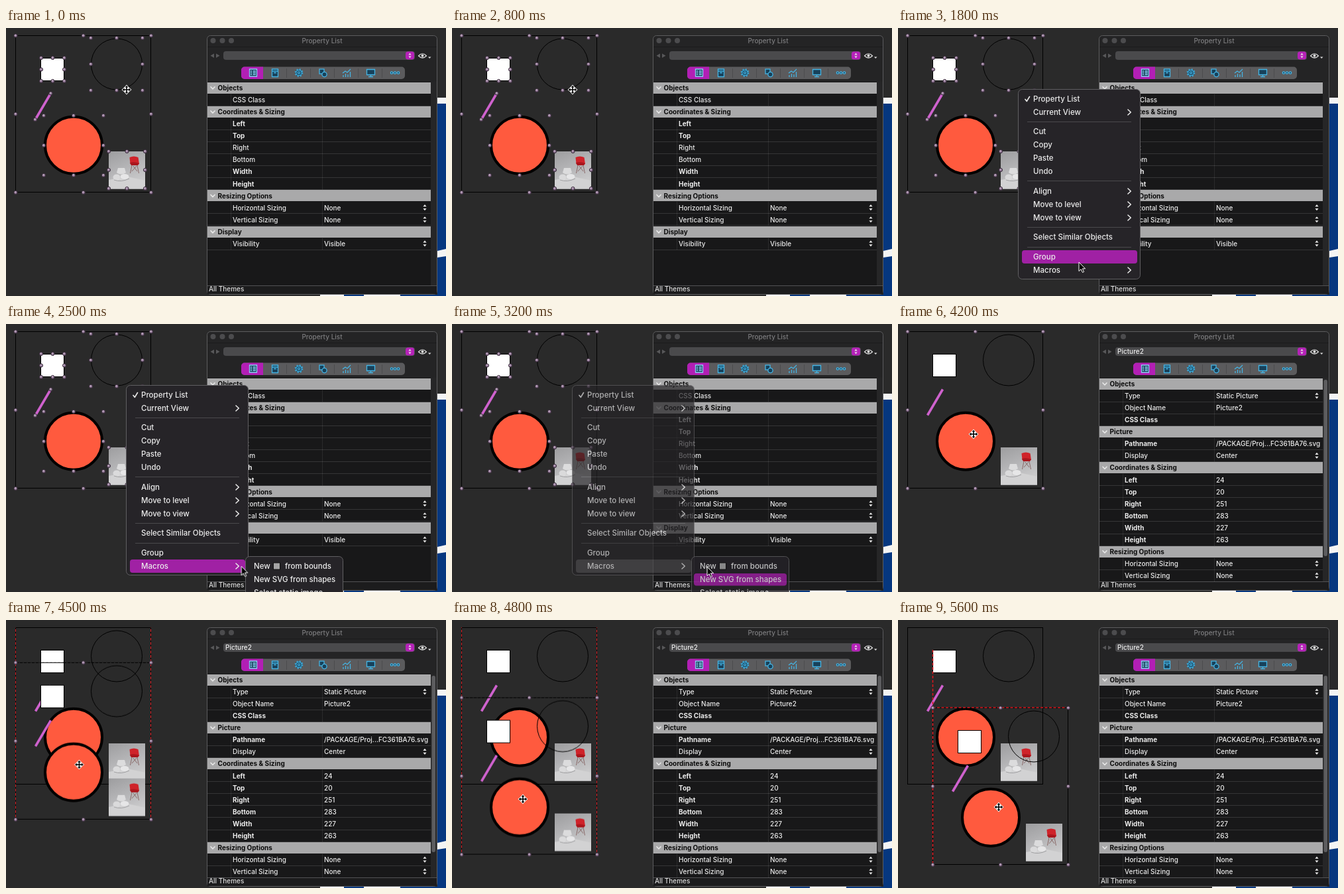
Recreate the animation shown at these times as an HTML page. Size 664 by 404 pixels, loop 5.7 s.

```html
<!DOCTYPE html>
<html lang="en">
<head>
<meta charset="utf-8">
<title>Shapes to SVG</title>
<style>
html, body { margin: 0; width: 100%; height: 100%; overflow: hidden; background: #2a2a2a; }
svg { display: block; }
text { font: 500 10px Inter, "Open Sans", sans-serif; fill: #ececec; white-space: pre; }
.bold { font-weight: 700; }
.menu text { font-size: 11.5px; }
.thin { fill: none; stroke: #000; }
.icon { fill: #17415a; stroke: #45b4e4; stroke-width: 1.3; }
.guide { stroke: #d8161d; stroke-dasharray: 4 2.5; fill: none; }
.chev { fill: none; stroke: #e8e8e8; stroke-width: 1.6; stroke-linecap: round; stroke-linejoin: round; }

/* every step lasts 100 ms, 57 steps per loop */
.anim { animation: 5.7s step-end infinite; }
#cursor { animation-name: cursor; }
#arrow { animation-name: arrow; }
#cross { animation-name: cross; }
#menu { animation-name: menu; }
#submenu { animation-name: submenu; }
#hover { animation-name: hover; }
#subHover { animation-name: subHover; }
#before { animation-name: before; }
#after { animation-name: after; }
#marks { animation-name: before; }
.drag { animation-name: drag; }
#copy { animation-name: copy; }
#sideGuides { animation-name: sideGuides; }
#snapGuides { animation-name: snapGuides; }

@keyframes cursor {
  0% { transform: translate(182px, 93px); }
  22.80% { transform: translate(182px, 93px); animation-timing-function: steps(5); }
  31.57% { transform: translate(273px, 353px); }
  33.33% { transform: translate(280px, 362px); }
  36.84% { transform: translate(280px, 362px); animation-timing-function: steps(5); }
  45.61% { transform: translate(374px, 366px); }
  47.36% { transform: translate(376px, 368px); animation-timing-function: steps(2); }
  50.87% { transform: translate(390px, 382px); }
  54.38% { transform: translate(388px, 374px); }
  56.14% { transform: translate(385px, 366px); animation-timing-function: steps(8); }
  70.17% { transform: translate(114px, 166px); }
  73.68% { transform: translate(114px, 166px); animation-timing-function: steps(6); }
  84.21% { transform: translate(107px, 270px); animation-timing-function: steps(6); }
  94.73% { transform: translate(150px, 281px); }
  96.49%, 100% { transform: translate(152px, 282px); }
}
@keyframes arrow {
  0% { opacity: 0; } 22.80% { opacity: 1; } 64.91%, 100% { opacity: 0; }
}
@keyframes cross {
  0% { opacity: 1; } 22.80% { opacity: 0; } 64.91%, 100% { opacity: 1; }
}
@keyframes menu {
  0% { opacity: 0; } 22.80% { opacity: 1; } 54.38% { opacity: .9; }
  56.14% { opacity: .7; } 57.89% { opacity: .3; } 59.64%, 100% { opacity: 0; }
}
@keyframes submenu {
  0% { opacity: 0; } 36.84% { opacity: 1; } 54.38% { opacity: .92; }
  56.14% { opacity: .8; } 57.89% { opacity: .35; } 59.64%, 100% { opacity: 0; }
}
@keyframes hover {
  0% { opacity: 0; transform: translateY(0); fill: #a021a4; }
  24.56% { opacity: 1; transform: translateY(-189px); fill: #a021a4; }
  26.31% { opacity: 1; transform: translateY(-149px); fill: #a021a4; }
  28.07% { opacity: 1; transform: translateY(-99px); fill: #a021a4; }
  29.82% { opacity: 0; transform: translateY(0); fill: #a021a4; }
  31.57% { opacity: 1; transform: translateY(0); fill: #a021a4; }
  33.33% { opacity: 1; transform: translateY(20px); fill: #a021a4; }
  45.61%, 100% { opacity: 1; transform: translateY(20px); fill: #4b494d; }
}
@keyframes subHover {
  0% { opacity: 0; transform: translateY(0); }
  45.61% { opacity: 1; transform: translateY(0); }
  49.12%, 100% { opacity: 1; transform: translateY(20px); }
}
@keyframes before { 0% { opacity: 1; } 59.64%, 100% { opacity: 0; } }
@keyframes after { 0% { opacity: 0; } 59.64%, 100% { opacity: 1; } }
@keyframes drag {
  0% { transform: translate(0, 0); }
  73.68% { transform: translate(0, 0); animation-timing-function: steps(6); }
  84.21% { transform: translate(0, 105.6px); animation-timing-function: steps(6); }
  94.73% { transform: translate(36px, 115px); }
  96.49%, 100% { transform: translate(38px, 121px); }
}
@keyframes copy { 0% { opacity: 0; } 75.43%, 100% { opacity: 1; } }
@keyframes sideGuides { 0% { opacity: 0; } 75.43% { opacity: 1; } 85.96%, 100% { opacity: 0; } }
@keyframes snapGuides { 0% { opacity: 0; } 96.49%, 100% { opacity: 1; } }
</style>
</head>
<body>
<svg width="664" height="404" viewBox="0 0 664 404">
  <defs>
    <linearGradient id="wall" x2=".4" y2="1">
      <stop offset="0" stop-color="#9d9d9f"/><stop offset=".6" stop-color="#b8b8ba"/><stop offset="1" stop-color="#cccccd"/>
    </linearGradient>
    <radialGradient id="knob" cx=".4" cy=".35">
      <stop offset="0" stop-color="#cdb8ce"/><stop offset="1" stop-color="#836a88"/>
    </radialGradient>
    <clipPath id="list"><rect x="304" y="81" width="337" height="307"/></clipPath>
    <clipPath id="below"><rect y="11" width="664" height="393"/></clipPath>
    <circle id="handle" r="2.6" fill="url(#knob)" stroke="#3c2f3e"/>
    <g id="updown" fill="#e8e8e8"><path d="M-2.6-1.4L0-4.6 2.6-1.4zM-2.6 1.4L0 4.6 2.6 1.4z"/></g>
    <g id="shapes">
      <rect class="thin" x="14.5" y="11.5" width="204" height="236"/>
      <circle cx="102" cy="176.7" r="43" fill="#ff5a3e" stroke="#000" stroke-width="4"/>
      <rect x="52.5" y="45.5" width="35" height="34" fill="#fff" stroke="#000"/>
      <circle class="thin" cx="167" cy="54.5" r="38.5"/>
      <path d="M67.5 98.5L44.5 137.5" stroke="#cf62ce" stroke-width="3.6"/>
      <g>
        <rect x="155" y="186" width="55" height="56.5" fill="url(#wall)"/>
        <path d="M155 229L183 224 210 230V242.5H155z" fill="#d2d2d3"/>
        <path d="M190 207L187.5 219M198 207L200.500 219M192 208L198 216M197 208L190 216" stroke="#7d5552" stroke-width=".8"/>
        <path d="M186.500 195Q193 192 199.500 195L201 205Q194 208 187.500 205z" fill="#cf232a"/>
        <path d="M187 203Q194 201 201 204L199 207H189z" fill="#a9161d"/>
        <path d="M169 211H179L181 218Q174 223 167 218z" fill="#dcdcdd"/>
        <ellipse cx="167" cy="225" rx="5.500" ry="4.500" fill="#dadadb"/>
        <ellipse cx="179" cy="224" rx="6.500" ry="4" fill="#e6e6e7"/>
        <path d="M163 229Q174 233 186 227" fill="none" stroke="#a0a0a2"/>
      </g>
    </g>
  </defs>

  <rect width="664" height="404" fill="#2a2a2a"/>
  <path d="M651 105H664V404H595V402H651z" fill="#06377f"/>
  <path d="M651 105H664V114H651zM651 336L664 333V344L651 346zM474 402H510V404H474zM540 402H595V404H540z" fill="#f4f4f4"/>
  <rect x="510" y="402" width="30" height="2" fill="#06377f"/>

  <use href="#shapes"/>
  <g id="copy" class="anim"><use href="#shapes" class="anim drag"/></g>
  <g clip-path="url(#below)"><g id="sideGuides" class="anim">
    <path class="anim drag guide" d="M14.5-130V248M218.5-130V248"/>
    <path class="anim drag" d="M19 11.5H215" stroke="#2a2a2a" stroke-dasharray="2 4"/>
  </g></g>
  <path id="snapGuides" class="anim guide" d="M52.5 45V369M52.5 132H257" stroke-width="1.6"/>
  <g id="marks" class="anim"></g>
  <g id="pageMarks" class="anim drag"></g>

  <g id="panel">
    <rect x="303.5" y="11.5" width="347" height="390" rx="5" fill="#242425" stroke="#5c5c5e"/>
    <path d="M304 28.5H650" stroke="#1b1b1c"/>
    <g fill="#4c4c4e"><circle cx="312.5" cy="19" r="4"/><circle cx="326.5" cy="19" r="4"/><circle cx="340" cy="19" r="4"/></g>
    <text x="477" y="22.7" text-anchor="middle" style="fill:#7d7d7f">Property List</text>
    <path d="M314 38.5V45L308.5 41.7zM317 38.5V45L322.5 41.7z" fill="#58585a"/>
    <rect x="328" y="35" width="289" height="13" rx="4" fill="#4a4a4c"/>
    <rect x="603" y="35.5" width="13" height="12" rx="3.5" fill="#b522b8"/>
    <use href="#updown" transform="translate(609.5 41.5) scale(.8)"/>
    <path d="M622.5 42Q628.5 35.5 634.5 42 628.5 48 622.5 42z" fill="none" stroke="#ddd" stroke-width="1.2"/>
    <circle cx="628.5" cy="41.8" r="2" fill="#ddd"/>
    <path d="M637 43.5H641.5L639.2 46z" fill="#ddd"/>
    <rect x="355" y="58.5" width="247" height="18.5" rx="5" fill="#5b5b5d"/>
    <path d="M388 58.5H360a5 5 0 0 0-5 5V72a5 5 0 0 0 5 5H388z" fill="#b21fb5"/>
    <path d="M423.5 61V75M459.5 61V75M495.5 61V75M531.5 61V75M567.5 61V75" stroke="#4c4c4e"/>
    <g class="icon">
      <path d="M367.5 62H378.5V73H367.5zM369 65H371M372.5 65H377M369 67.5H371M372.5 67.5H377M369 70H371M372.5 70H377" stroke="#8ed0f5"/>
      <path d="M401.5 62H410.5V73.5H401.5zM401.5 65H410.5M404 67.5H408"/>
      <circle cx="442" cy="67.5" r="5.6" stroke-dasharray="2.2 2.2"/>
      <circle cx="442" cy="67.5" r="4.2"/><circle cx="442" cy="67.5" r="1.6"/>
      <rect x="473" y="62" width="7" height="7"/><circle cx="480.5" cy="70" r="3.6"/>
      <path d="M509 74V71M512.5 74V69M516 74V70M519.5 74V66M508 68L512 65 515 67 520 62" fill="none"/>
      <path d="M544.5 62.5H556.5V70.5H544.5zM550.5 71V73.5M547 73.5H554"/>
      <circle cx="582" cy="67.5" r="1.7"/><circle cx="587" cy="67.5" r="1.7"/><circle cx="592" cy="67.5" r="1.7"/>
    </g>
    <rect x="304" y="81" width="337" height="307" fill="#181819"/>
    <rect x="641" y="81" width="9" height="307" fill="#262627"/>
    <g clip-path="url(#list)"><g id="before" class="anim"></g></g>
    <g id="after" class="anim"></g>
    <path d="M304 388.5H650" stroke="#525254"/>
    <rect x="304" y="389" width="346" height="12" fill="#1c1c1d"/>
    <text x="306" y="397.3" style="fill:#dcdcdc">All Themes</text>
  </g>

  <g id="menu" class="menu anim">
    <rect x="181.5" y="92.5" width="184" height="286" rx="6" fill="#262428" stroke="#605f62"/>
    <rect id="hover" class="anim" x="187" y="335" width="174" height="20" rx="4"/>
    <path d="M192 107.5L194.3 110.5 198.5 103.5" class="chev"/>
    <path d="M195 141.5H352M195 230.5H352M195 300.5H352M195 330.5H352" stroke="#4a494c"/>
  </g>
  <g id="submenu" class="menu anim">
    <rect x="361.5" y="350.5" width="147" height="80" rx="6" fill="#262428" stroke="#605f62"/>
    <rect id="subHover" class="anim" x="365" y="356" width="140" height="18.5" rx="4" fill="#a021a4"/>
    <rect x="403.5" y="360" width="10" height="10" fill="#a5a5a5" stroke="#111"/>
  </g>

  <g id="cursor" class="anim">
    <path id="arrow" class="anim" d="M0 0V13.5L3.2 10.6 5.5 15.5 7.6 14.5 5.4 9.8H9.6z" fill="#000" stroke="#fff"/>
    <g id="cross" class="anim">
      <path d="M0-7.5L3.6-3.6 7.5 0 3.6 3.6 0 7.5-3.6 3.6-7.5 0-3.6-3.6z" fill="#fff"/>
      <path d="M0-6.3L2.4-3.5H.8V-.8H3.5V-2.4L6.3 0 3.5 2.4V.8H.8V3.5H2.4L0 6.3-2.4 3.5H-.8V.8H-3.5V2.4L-6.3 0-3.5-2.4V-.8H-.8V-3.5H-2.4z" fill="#000"/>
    </g>
  </g>
</svg>
<script>
const byId = id => document.getElementById(id);
const add = (id, markup) => byId(id).insertAdjacentHTML('beforeend', markup);
const label = (x, y, s, attrs = '') => `<text x="${x}" y="${y}" ${attrs}>${s.replace('&', '&amp;')}</text>`;
const handle = (x, y) => `<use href="#handle" x="${x}" y="${y}"/>`;

// eight handles around a box
function frame(x1, y1, x2, y2) {
  const mx = (x1 + x2) / 2, my = (y1 + y2) / 2;
  return [[x1, y1], [mx, y1], [x2, y1], [x1, my], [x2, my], [x1, y2], [mx, y2], [x2, y2]]
    .map(p => handle(...p)).join('');
}
add('marks', frame(53, 45, 88, 80) + frame(128, 15, 206, 94) + frame(57, 132, 147, 222)
  + frame(155, 186, 210, 242) + handle(67.5, 98.5) + handle(44, 138));
add('pageMarks', frame(14.5, 11.5, 219, 248));

// "#" marks a section, "*" a bold label, a trailing "^" a popup value
function rows(id, lines) {
  lines.forEach((line, i) => {
    const y = 90.3 + i * 18.07, top = Math.round(y - 8.6), base = (y + 3.6).toFixed(1);
    if (line[0] === '#') {
      add(id, `<rect x="304" y="${top}" width="337" height="17" fill="#a9a9aa"/>
        <path class="chev" d="M309 ${y - 1.5}l3 3.2 3-3.2"/>`
        + label(319.5, base, line.slice(1), 'class="bold" style="fill:#0c0c0c"'));
      return;
    }
    const [name, value = ''] = line.split('|');
    const bold = name[0] === '*';
    add(id, `<path d="M304 ${top + 17.5}H641" stroke="#353536"/>
      <path d="M339.5 ${top}v18M477.5 ${top}v18" stroke="#3c3c3d" stroke-dasharray="1 1"/>`
      + label(342, base, bold ? name.slice(1) : name, bold ? 'class="bold"' : '')
      + label(480, base, value.replace('^', ''))
      + (value.endsWith('^') ? `<use href="#updown" transform="translate(632 ${y - .3})"/>` : ''));
  });
}
const sizing = ['#Resizing Options', 'Horizontal Sizing|None^', 'Vertical Sizing|None^'];
rows('before', ['#Objects', 'CSS Class', '#Coordinates & Sizing', '*Left', '*Top', 'Right', 'Bottom',
  '*Width', '*Height', ...sizing, '#Display', 'Visibility|Visible^']);
add('after', '<rect x="304" y="81" width="337" height="307" fill="#181819"/>');
rows('after', ['#Objects', 'Type|Static Picture^', 'Object Name|Picture2', '*CSS Class', '#Picture',
  '*Pathname|/PACKAGE/Proj...FC361BA76.svg', 'Display|Center^', '#Coordinates & Sizing', '*Left|24',
  '*Top|20', '*Right|251', '*Bottom|283', '*Width|227', '*Height|263', ...sizing]);
add('after', label(331, 45.1, 'Picture2')
  + '<rect x="642.5" y="84" width="5.5" height="266" rx="2.7" fill="#5d5d5f"/>');

const items = { 107: 'Property List', 127: 'Current View>', 156: 'Cut', 176: 'Copy', 196: 'Paste', 216: 'Undo',
  246: 'Align>', 266: 'Move to level>', 286: 'Move to view>', 315: 'Select Similar Objects', 345: 'Group', 365: 'Macros>' };
for (const [y, item] of Object.entries(items)) {
  add('menu', label(204, +y + 4.1, item.replace('>', ''))
    + (item.endsWith('>') ? `<path class="chev" d="M347 ${y - 4}l4.3 4-4.3 4"/>` : ''));
}
add('submenu', label(374, 369.1, 'New') + label(421, 369.1, 'from bounds')
  + label(374, 389, 'New SVG from shapes') + label(374, 408.5, 'Select static image'));
</script>
</body>
</html>
```
